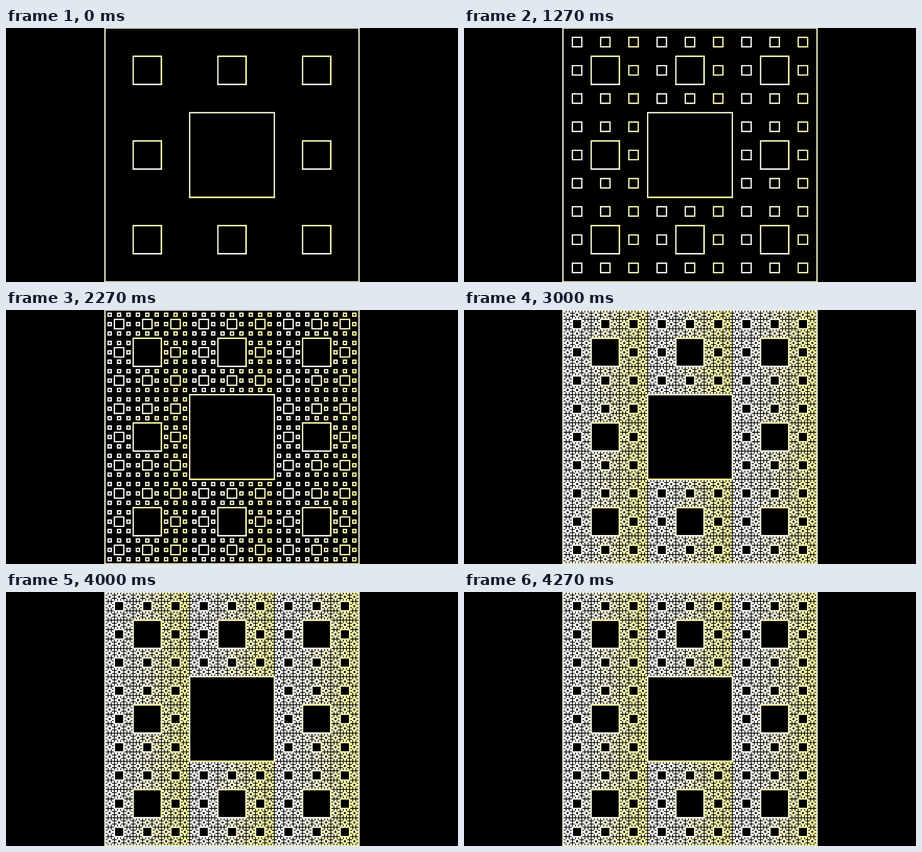
An HTML page for the animation above (4990 ms loop, 854 by 480 pixels).

```html
<!DOCTYPE html>
<html lang="en">
<head>
<meta charset="utf-8">
<title>Square carpet</title>
<style>
  html, body { margin: 0; width: 100%; height: 100%; overflow: hidden; background: #000; }
  svg { display: block; width: 100vw; height: 100vh; }
  path { fill: none; stroke-width: 2.4; }
</style>
</head>
<body>
<svg id="stage" viewBox="0 0 854 480">
  <defs>
    <linearGradient id="tint" gradientUnits="userSpaceOnUse" x1="187" y1="0" x2="347" y2="0" spreadMethod="repeat">
      <stop offset="0.1" stop-color="#fff"/>
      <stop offset="0.35" stop-color="#fffff0"/>
      <stop offset="0.9" stop-color="#ffffa8"/>
    </linearGradient>
  </defs>
</svg>
<script>
const LOOP = 4990;
const LEFT = 187, SIDE = 480, DEPTH = 5;
const PALE = '#ffffdc', YELLOW = '#ffff98', SOFT = '#ffffa8', WHITE = '#fff';
const stage = document.getElementById('stage');
const levels = Array.from({ length: DEPTH + 1 }, () => []);

// Collects the centre hole of each cell, level by level.
function carve(x, y, size, level) {
  const third = size / 3;
  levels[level].push([x + third, y + third, third]);
  if (level === DEPTH) return;
  for (let i = 0; i < 9; i++) {
    if (i !== 4) carve(x + (i % 3) * third, y + Math.floor(i / 3) * third, third, level + 1);
  }
}

levels[0].push([LEFT, 0, SIDE]);
carve(LEFT, 0, SIDE, 1);

const outline = ([x, y, s]) => `M${x.toFixed(2)} ${y.toFixed(2)}h${s}v${s}h${-s}z`;
const topRight = ([x, y, s]) => `M${x} ${y}h${s}v${s}`;
const bottom = ([x, y, s]) => `M${x - 1.2} ${y + s}h${s + 2.4}`;

function draw(squares, shape, stroke) {
  const path = document.createElementNS(stage.namespaceURI, 'path');
  path.setAttribute('d', squares.map(shape).join(''));
  path.setAttribute('stroke', stroke);
  stage.append(path);
  return path;
}

// Finer levels lie below the coarse outlines.
const fine = [5, 4, 3].map(level => ({
  path: draw(levels[level], outline, 'url(#tint)'),
  start: (level - 2) * 1000
}));
const large = [...levels[0], ...levels[1]];
draw(large, outline, PALE);
draw(large, bottom, YELLOW);
draw(levels[2], outline, PALE);
draw(levels[2], topRight, SOFT);
draw(levels[2], bottom, WHITE);

function render(time) {
  for (const { path, start } of fine) {
    path.style.display = time >= start ? '' : 'none';
  }
}

const origin = performance.now();
function tick() {
  render((performance.now() - origin) % LOOP);
  requestAnimationFrame(tick);
}
tick();
</script>
</body>
</html>
```
